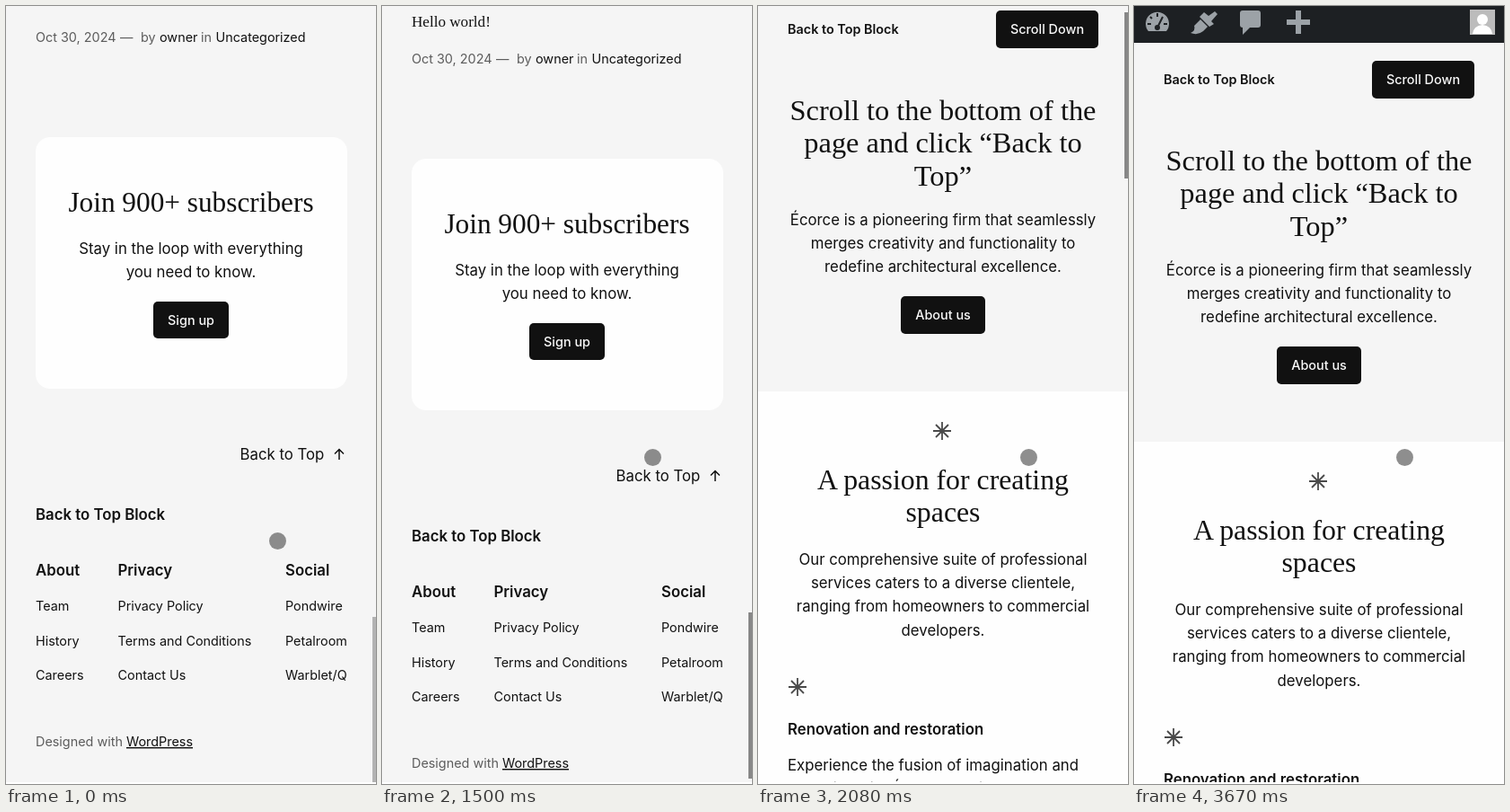
Recreate the animation shown at these times as an HTML page. Size 412 px wide and 866 px high, loop 3760 ms.

```html
<!DOCTYPE html>
<html lang="en">
<head>
<meta charset="utf-8">
<title>Back to Top Block</title>
<style>
  html, body { margin: 0; width: 100%; height: 100%; overflow: hidden; background: #fff; }
  svg { display: block; }
  text { font-family: Inter, sans-serif; white-space: pre; }
  .serif { font-family: "Liberation Serif", serif; }
  .quote { font-family: "Liberation Serif", serif; font-style: italic; }
</style>
</head>
<body>
<svg id="stage" width="412" height="864" viewBox="0 0 412 864">
  <g id="page"></g>
  <rect id="thumb" x="408" width="4" height="185" fill="#878787"/>
  <circle id="cursor" r="9.5" fill="#585858" fill-opacity=".68"/>
</svg>
<script>
const LOOP = 3760, FPS = 12, BOTTOM = 3135;
const PAPER = '#f5f5f5', WHITE = '#fefefe', DARK = '#111', INK = '#111',
      MUTED = '#8f8f8f', GREY = '#5c5c5c', BAR = '#1d2023', ICON = '#9ca2a7', PALE = '#f9f9f9';
const BODY = 16.8, SMALL = 14.4, MID = 206, LEFT = 33;
const $ = id => document.getElementById(id);
const page = $('page');

function add(tag, attrs, content = '') {
  const el = document.createElementNS('http://www.w3.org/2000/svg', tag);
  for (const k in attrs) el.setAttribute(k, attrs[k]);
  el.textContent = content;
  page.append(el);
}
const rect = (x, y, width, height, fill, rx = 0) => add('rect', { x, y, width, height, fill, rx });
const path = (d, attrs) => add('path', { d, fill: 'none', ...attrs });
const text = (x, y, str, size = BODY, opts) =>
  add('text', { x, y, 'font-size': size, fill: INK, ...opts }, str);
const bold = (x, y, str, size) => text(x, y, str, size, { 'font-weight': 600 });
const center = (y, str, size, opts) => text(MID, y, str, size, { 'text-anchor': 'middle', ...opts });
const lines = (y, step, list, size, opts) =>
  list.forEach((s, i) => center(Math.round(y + i * step), s, size, opts));
const heading = (y, list, size = 31.8) => lines(y, 36.3, list, size, { class: 'serif' });
const star = (x, y) => path('M-10 0H10M0-10V10M-7-7L7 7M-7 7L7-7',
  { transform: `translate(${x} ${y})`, stroke: '#4a4a4a', 'stroke-width': 1.8 });

function button(x, y, w, h, label) {
  rect(x, y, w, h, DARK, 5);
  text(x + w / 2, y + h / 2 + 5, label, SMALL,
    { fill: PALE, 'font-weight': 500, 'text-anchor': 'middle' });
}

function service(y, title, copy) {
  y = Math.round(y);
  star(44, y);
  bold(LEFT, y + 53, title);
  copy.forEach((s, i) => text(LEFT, y + 93 + i * 26, s));
}

const suite = ['Our comprehensive suite of professional', 'services caters to a diverse clientele,',
  'ranging from homeowners to commercial', 'developers.'];
const fusion = ['Experience the fusion of imagination and',
  'expertise with Écorce Architectural', 'Solutions.'];

function toolbar() {
  rect(0, 0, 412, 41, BAR);
  path('M16 28A13 13 0 1 1 36 28Z', { fill: ICON });
  path('M26 8v4M18 12l2 2M15 20h4M33 20h4M26 24L32 12', { stroke: BAR, 'stroke-width': 2 });
  add('circle', { cx: 26, cy: 24, r: 3, fill: BAR });
  path('M63 30Q69 27 67 22L74 15L82 23L77 28Q71 33 63 30Z', { fill: ICON });
  path('M73 12L78 7L83 11L90 6L93 9L86 17L89 20L84 23Z', { fill: ICON });
  rect(118, 5, 23, 19, ICON, 3);
  path('M121 22V32L130 23Z', { fill: ICON });
  path('M170 18H196M183 5V31', { stroke: ICON, 'stroke-width': 6 });
  rect(374, 4, 28, 28, '#bcbcbc');
  add('circle', { cx: 388, cy: 15, r: 6, fill: WHITE });
  path('M377 31Q378 22 388 21Q398 22 399 31Z', { fill: WHITE });
}

function intro() {
  bold(LEFT, 87, 'Back to Top Block', SMALL);
  button(265, 61, 114, 42, 'Scroll Down');
  heading(183, ['Scroll to the bottom of the', 'page and click “Back to', 'Top”'], 32.4);
  lines(300, 26, ['Écorce is a pioneering firm that seamlessly',
    'merges creativity and functionality to', 'redefine architectural excellence.']);
  button(159, 379, 94, 42, 'About us');
}

function services() {
  rect(0, 485, 412, 1389, WHITE);
  star(205, 529);
  heading(594, ['A passion for creating', 'spaces']);
  lines(678, 26.2, suite);
  ['Renovation and restoration', 'Continuous Support', 'App Access', 'Consulting',
    'Project Management', 'Architectural Solutions']
    .forEach((title, i) => service(814 + i * 174.6, title, fusion));
}

function resources() {
  star(205, 1915);
  heading(1981, ['An array of resources'], 31.5);
  lines(2025, 26, suite);
  service(2141, 'Project Management', fusion);
  service(2341, 'Consulting', fusion);
}

function quote() {
  rect(0, 2617, 412, 409, DARK);
  lines(2696, 36.8, ['“Écorce has saved us', 'thousands of hours of', 'work and has unlocked',
    'insights we never thought', 'possible.”'], 29.4, { class: 'quote', fill: PALE });
  center(2943, 'Clara Weidner', BODY, { fill: PALE });
  center(2966, 'CEO, Mossledger', SMALL, { fill: MUTED });
}

function posts() {
  text(LEFT, 3083, 'Watch, Read, Listen', 32.1, { class: 'serif' });
  rect(LEFT, 3110, 346, 1, MUTED);
  text(LEFT, 3134, 'Hello world!', 17.1, { class: 'serif' });
  [[33, 'Oct 30, 2024'], [127, '—'], [150, 'by'], [217, 'in']]
    .forEach(([x, s]) => text(x, 3175, s, SMALL, { fill: GREY }));
  text(171, 3175, 'owner', SMALL);
  text(233.5, 3175, 'Uncategorized', SMALL);
}

function subscribe() {
  rect(LEFT, 3281, 347, 280, WHITE, 16);
  heading(3364, ['Join 900+ subscribers'], 31.3);
  lines(3411, 26, ['Stay in the loop with everything', 'you need to know.']);
  button(164, 3464, 84, 41, 'Sign up');
}

function footer() {
  text(260.5, 3640, 'Back to Top');
  path('M371 3640V3629M366 3633.5L371 3628.5L376 3633.5', { stroke: INK, 'stroke-width': 1.5 });
  bold(LEFT, 3707, 'Back to Top Block');
  [[33, 'About', 'Team', 'History', 'Careers'],
    [124.5, 'Privacy', 'Privacy Policy', 'Terms and Conditions', 'Contact Us'],
    [311, 'Social', 'Pondwire', 'Petalroom', 'Warblet/Q']].forEach(([x, title, ...items]) => {
    bold(x, 3769, title);
    items.forEach((s, i) => text(x, Math.round(3808 + i * 38.5), s, SMALL));
  });
  text(LEFT, 3959, 'Designed with', SMALL, { fill: GREY });
  text(134, 3959, 'WordPress', SMALL, { 'text-decoration': 'underline' });
}

rect(0, 0, 412, 4010, PAPER);
[toolbar, intro, services, resources, quote, posts, subscribe, footer].forEach(draw => draw());

const clamp = v => Math.min(1, Math.max(0, v));
const ease = (v, p) => v < .5 ? .5 * (2 * v) ** p : 1 - .5 * (2 - 2 * v) ** p;
const progress = (t, start, length, p) => ease(clamp((t - start) / length), p);

// The scrollbar fades out after each scroll and returns with the next one.
const thumbOpacity = t => clamp(t < 1450 ? .6 - t / 417 : 1 - (t - 2417) / 416);

function frame(now) {
  const t = Math.floor((now % LOOP + 4) * FPS / 1000) * 1000 / FPS;
  const scroll = Math.round(BOTTOM * (1 - progress(t, 1447.6, 713, 2.18)));
  const move = progress(t, 0, 583, 2);
  page.setAttribute('transform', `translate(0 ${-scroll})`);
  $('thumb').setAttribute('y', Math.round(scroll * .2185 - 5));
  $('thumb').setAttribute('opacity', thumbOpacity(t));
  $('cursor').setAttribute('cx', 302.5 - move);
  $('cursor').setAttribute('cy', 595.5 - 93 * move);
  requestAnimationFrame(frame);
}
frame(0);
</script>
</body>
</html>
```
